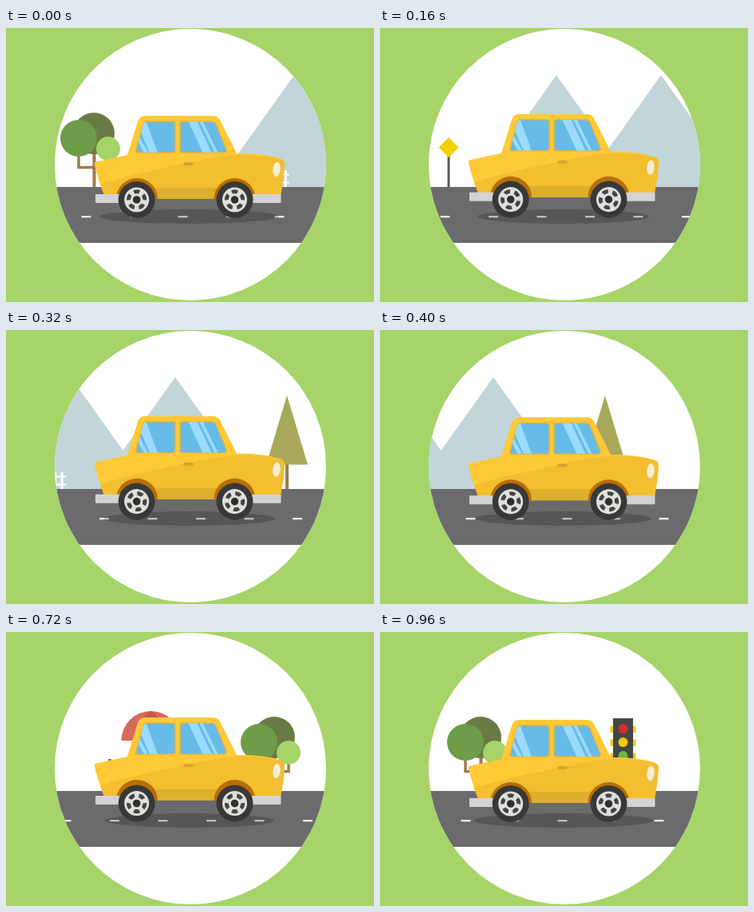
Recreate the animation shown at these times as an HTML page. Size 461x343 px, loop 1000 ms.

```html
<!DOCTYPE html>
<html lang="en">
<head>
<meta charset="utf-8">
<title>Yellow car</title>
<style>
  html, body { margin: 0; width: 100%; height: 100%; overflow: hidden; background: #a6d468; }
  svg { display: block; width: 100vw; height: 100vh; }
</style>
</head>
<body>
<svg viewBox="0 0 461 343">
  <defs>
    <clipPath id="disc"><circle cx="231" cy="171" r="170"/></clipPath>
    <clipPath id="bodyClip">
      <path id="bodyShape" d="M111 171Q110 168 113 167.500L152 159L165 117Q167.500 110 174 110H259Q265 110 268 115L289 157Q322 156 344 163.500Q350 166 349 172Q348 190 344 209H312V214H139V209H123Q114 186 111 171Z"/>
    </clipPath>
    <clipPath id="rearGlass"><path id="rearPane" d="M176 117H209Q212 117 212 120V153Q212 156 209 156H166Q162 156 163 152L172 120Q173 117 176 117Z"/></clipPath>
    <clipPath id="frontGlass"><path id="frontPane" d="M221 117H258Q261 117 263 120L276 152Q277 156 273 156H221Q218 156 218 153V120Q218 117 221 117Z"/></clipPath>
    <g id="trees">
      <g fill="none" stroke="#9b7b50" stroke-width="3.500">
        <path d="M0 158V174.500H37V164"/>
        <path d="M19.500 150V200" stroke-width="4"/>
      </g>
      <circle cx="19" cy="132" r="26" fill="#697b45"/>
      <circle cy="138" r="23" fill="#6e9c49"/>
      <circle cx="37" cy="151" r="15" fill="#a6d468"/>
    </g>
    <g id="chair" fill="none" stroke="#7d775f" stroke-width="4">
      <path d="M54 159V199M54 179H34.500M36 177V199"/>
    </g>
    <g id="wheel">
      <circle r="23" fill="#383838"/>
      <circle r="15.500" fill="#dfdfdb"/>
      <g class="slots" fill="#454545"></g>
      <circle r="7.500" fill="#dfdfdb"/>
      <circle r="4.800" fill="#303030"/>
    </g>
  </defs>

  <rect width="461" height="343" fill="#a6d468"/>
  <g clip-path="url(#disc)">
    <rect x="60" width="342" height="343" fill="#fff"/>
    <g id="scenery">
      <path fill="#c2d5d9" d="M261 199L361 59L461 199ZM392 199L492 59L592 199Z"/>
      <g id="fence" stroke="#fff" fill="none"></g>
      <circle cx="574" cy="200" r="18" fill="#667d43"/>
      <circle cx="557" cy="201" r="18" fill="#80a850"/>
      <use href="#trees" x="91"/>
      <g transform="translate(226)">
        <rect x="-1.500" y="160" width="3" height="39" fill="#58585a"/>
        <path d="M0 137L12.500 149.500L0 162L-12.500 149.500Z" fill="#f5d000"/>
      </g>
      <g transform="translate(632)">
        <rect x="-2" y="166" width="4" height="33" fill="#9b7b50"/>
        <path d="M0 82L26 168.500H-26Z" fill="#a9a75a"/>
      </g>
      <g transform="translate(811.500)">
        <rect x="-1.200" y="134" width="3" height="65" fill="#c5d6da"/>
        <path d="M-37 136A37 37 0 0 1 37 136Z" fill="#d8695d"/>
        <path d="M-15 136C-14 112 -6 100 0 99C6 100 14 112 15 136Z" fill="#c9574c"/>
        <use href="#chair"/>
        <use href="#chair" transform="translate(2.500) scale(-1 1)"/>
      </g>
      <use href="#trees" x="947"/>
      <g transform="translate(1144.500)">
        <rect x="-2" y="165" width="4" height="34" fill="#58585a"/>
        <path d="M-16 117.500H16V126H-16ZM-16 134.500H16V143H-16ZM-16 151.500H16V160H-16Z" fill="#f3c81e"/>
        <rect x="-12.500" y="108" width="25" height="60" fill="#434645"/>
        <circle cy="121" r="6" fill="#d92c2c"/>
        <circle cy="138" r="6" fill="#f8c813"/>
        <circle cy="155" r="6" fill="#6fb83a"/>
      </g>
    </g>

    <rect x="60" y="199" width="342" height="70" fill="#6b6a6d"/>
    <g id="dashes" fill="#fff"></g>
    <ellipse id="shadow" cx="229.500" cy="236" ry="9" fill="#000" opacity=".2"/>

    <g id="car">
      <use href="#bodyShape" fill="#ffc937"/>
      <g clip-path="url(#bodyClip)">
        <path d="M112 197C160 182 230 168 262 162Q308 154 352 166V220H112Z" fill="#f3be2f"/>
        <rect x="180" y="200" width="92" height="15" fill="#deaf2d"/>
      </g>
      <g fill="#b66e06">
        <path d="M138 214A26 26 0 0 1 190 214Z"/>
        <path d="M260.500 214A26 26 0 0 1 312.500 214Z"/>
      </g>
      <g fill="#67bbe7" stroke="#e8b33a" stroke-width="1.500">
        <use href="#rearPane"/>
        <use href="#frontPane"/>
      </g>
      <g fill="#99dcff">
        <path clip-path="url(#rearGlass)" d="M169 118H176L190 156H180L167 126ZM165 132L178 156H173L163 138Z"/>
        <path clip-path="url(#frontGlass)" d="M228 116H239L258 157H247ZM242 116H246L266 157H262Z"/>
      </g>
      <rect x="222.500" y="168" width="12" height="4" rx="1.500" fill="#d9a42a"/>
      <ellipse cx="339" cy="177" rx="5" ry="9.500" transform="rotate(6 339 177)" fill="#f7eed0" stroke="#e6c068" stroke-width=".8"/>
      <g fill="#d3d3d5">
        <rect x="112" y="208" width="32" height="11" rx="1"/>
        <rect x="308" y="208" width="36.500" height="11" rx="1"/>
      </g>
    </g>
    <g id="rear"><use href="#wheel"/></g>
    <g id="front"><use href="#wheel"/></g>
  </g>
</svg>
<script>
  const LOOP = 1000, STEP = 40, SPEED = 0.875;
  const BOB = 480, DASH_GAP = 60.5;
  const $ = id => document.getElementById(id);
  const repeat = (n, make) => Array.from({ length: n }, (_, i) => make(i)).join("");
  const move = (id, x, y, turn = 0) =>
    $(id).setAttribute("transform", `translate(${x} ${y}) rotate(${turn})`);

  $("fence").innerHTML =
    '<path d="M285 183.500H355M285 193.500H355" stroke-width="2"/>' +
    `<path d="${repeat(8, i => `M${291 + i * 8.45} 178V199`)}" stroke-width="3"/>`;
  $("dashes").innerHTML = repeat(8, i =>
    `<rect x="${i * DASH_GAP - 6}" y="235.200" width="12" height="2" rx=".5"/>`);
  document.querySelector(".slots").innerHTML = repeat(5, i =>
    `<path d="M-4.500 -11.500Q0 -14 4.500 -11.500L2.500 -7.500H-2.500Z" transform="rotate(${i * 72})"/>`);

  function draw(time) {
    const t = Math.floor((time % LOOP) / STEP) * STEP;
    const travel = t * SPEED;
    const lift = (1 - Math.cos(2 * Math.PI * t / BOB)) / 2;
    const turn = t / BOB * 360;

    move("scenery", -travel, 0);
    move("dashes", 40 - travel % DASH_GAP, 0);
    move("car", 0, -3 * lift);
    move("rear", 163.7, 215 - 0.5 * lift, turn);
    move("front", 286.5, 215 - 0.5 * lift, turn);
    $("shadow").setAttribute("rx", 112 - 6 * lift);
  }

  const start = performance.now();
  function tick() {
    draw(performance.now() - start);
    requestAnimationFrame(tick);
  }
  tick();
</script>
</body>
</html>
```
